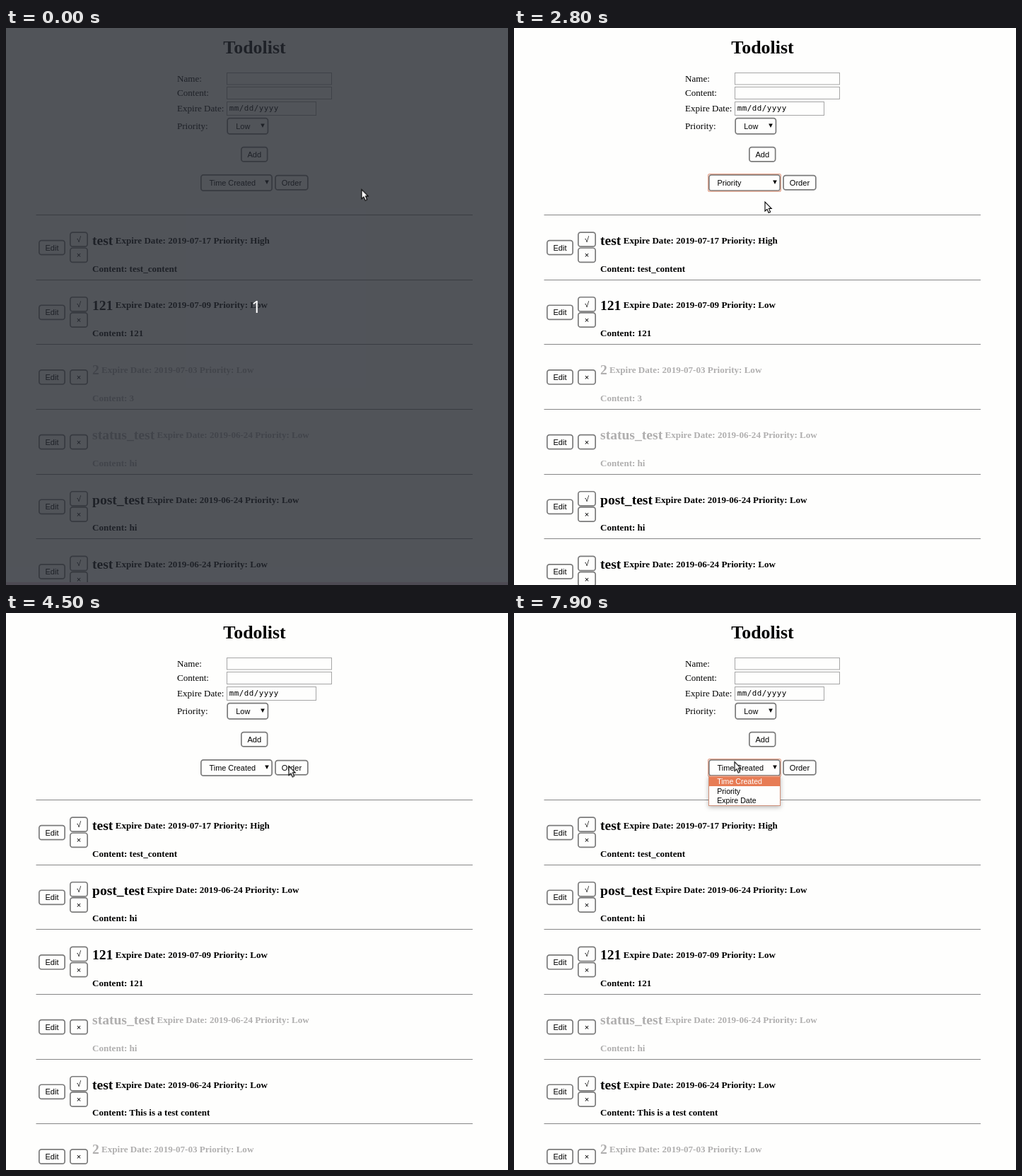
Animation of 710x788 px, one loop 8000 ms. Source, as an HTML page:

```html
<!DOCTYPE html>
<html lang="en">
<head>
<meta charset="utf-8">
<title>Todolist</title>
<style>
  html, body { margin: 0; width: 100%; height: 100%; overflow: hidden; background: #fefefd; }
  svg { display: block; width: 710px; height: 788px; }
  text { font: 13.07px "Liberation Serif", serif; white-space: pre; }
  .title { font-size: 25.9px; font-weight: bold; text-anchor: middle; }
  .row text { font-weight: bold; }
  .row .name { font-size: 19.6px; }
  .done text { fill: #b0afaf; }
  .ui { font: 10.9px "Liberation Sans", sans-serif; }
  .btn text { font: 11.1px "Liberation Sans", sans-serif; text-anchor: middle; }
  .btn rect { fill: #fefefd; stroke: #7b7b7b; stroke-width: 1.7; }
  .hot rect { fill: #808080; }
  .hot text { fill: #fff; }
  .field { fill: #fefefd; stroke: #a6a6a6; }
  .date { font: 10.9px "DejaVu Sans Mono", monospace; letter-spacing: .45px; }
  .ring { fill: none; stroke: #e3a189; stroke-width: 1.2; }
  .item { font: 10.6px "Liberation Sans", sans-serif; }
  .panel { fill: #fefefd; stroke: #cf8f78; filter: drop-shadow(0 2px 3px rgba(0, 0, 0, .28)); }
  .count { font: 24px "Noto Sans", sans-serif; fill: #fff; text-anchor: middle; }

  .anim, .cursor, .mark, .first, .second { animation: 8s step-end infinite; }
  .dim { animation-name: dim; }
  .before { animation-name: before; }
  .after { animation-name: after; }
  .created { animation-name: created; }
  .priority { animation-name: priority; }
  .menu { animation-name: menu; }
  .mark { animation-name: mark; }
  .first { animation-name: first; }
  .second { animation-name: second; }
  .selring { animation-name: selring; }
  .hover { animation-name: hover; }
  .btnring { animation-name: btnring; }
  .status { animation-name: status; }
  .blank1 { animation-name: blank1; }
  .blank2 { animation-name: blank2; }
  .cursor { animation-name: cursor; }

  @keyframes dim { 0% { opacity: 1 } 6.25%, 100% { opacity: 0 } }
  @keyframes before { 0% { opacity: 1 } 54%, 100% { opacity: 0 } }
  @keyframes after { 0% { opacity: 0 } 54%, 100% { opacity: 1 } }
  @keyframes created { 0% { opacity: 1 } 30% { opacity: 0 } 54%, 100% { opacity: 1 } }
  @keyframes priority { 0% { opacity: 0 } 30% { opacity: 1 } 54%, 100% { opacity: 0 } }
  @keyframes menu { 0% { opacity: 0 } 18.75% { opacity: 1 } 30% { opacity: 0 } 98.75%, 100% { opacity: 1 } }
  @keyframes mark { 0% { transform: none } 25% { transform: translateY(13.7px) } 50%, 100% { transform: none } }
  @keyframes first { 0% { fill: #fff } 25% { fill: #000 } 50%, 100% { fill: #fff } }
  @keyframes second { 0% { fill: #000 } 25% { fill: #fff } 50%, 100% { fill: #000 } }
  @keyframes selring { 0% { opacity: 0 } 18.75% { opacity: 1 } 43.75% { opacity: 0 } 98.75%, 100% { opacity: 1 } }
  @keyframes hover {
    0% { opacity: 0 } 11.25% { opacity: 1 } 12.5% { opacity: 0 }
    37.5% { opacity: 1 } 50% { opacity: 0 }
    67.5% { opacity: 1 } 68.75%, 100% { opacity: 0 }
  }
  @keyframes btnring { 0% { opacity: 0 } 43.75% { opacity: 1 } 50%, 100% { opacity: 0 } }
  @keyframes status { 0% { opacity: 0 } 47.5% { opacity: 1 } 52.5%, 100% { opacity: 0 } }
  @keyframes blank1 { 0% { opacity: 0 } 50% { opacity: 1 } 56.25%, 100% { opacity: 0 } }
  @keyframes blank2 { 0% { opacity: 0 } 52.5% { opacity: 1 } 56.25%, 100% { opacity: 0 } }
  @keyframes cursor {
    0% { transform: translate(503px, 228.5px); opacity: 1 }
    7.5% { transform: translate(492px, 227px) }
    8.75% { transform: translate(467px, 222px) }
    10% { transform: translate(434px, 217px) }
    11.25% { transform: translate(402px, 214px) }
    12.5% { transform: translate(378px, 213px) }
    13.75% { transform: translate(367px, 213.5px) }
    21.25% { transform: translate(364px, 224.5px) }
    23.75% { transform: translate(357px, 238px) }
    25% { transform: translate(349px, 249px) }
    30% { transform: translate(348.5px, 252.5px) }
    35% { transform: translate(355px, 246px) }
    36.25% { transform: translate(371px, 233px) }
    37.5% { transform: translate(387px, 223px) }
    38.75% { transform: translate(396px, 218px) }
    40% { transform: translate(400px, 216.5px) }
    67.5% { transform: translate(394px, 212px) }
    68.75% { transform: translate(335px, 172px) }
    70% { transform: translate(251.5px, 113.5px); opacity: 1 }
    71.25% { transform: translate(251.5px, 113.5px); opacity: 0 }
    86.25% { transform: translate(228.5px, 104.5px); opacity: 1 }
    87.5% { transform: translate(258px, 140px) }
    88.75% { transform: translate(292px, 181px) }
    90% { transform: translate(310.5px, 200px) }
    92.5%, 100% { transform: translate(312px, 210.5px); opacity: 1 }
  }
</style>
</head>
<body>
<svg id="stage" viewBox="0 0 710 788"></svg>
<script>
const text = (x, y, str, cls = "") => `<text x="${x}" y="${y}" class="${cls}">${str}</text>`;
const rect = (x, y, w, h, attrs = "") =>
  `<rect x="${x}" y="${y}" width="${w}" height="${h}" ${attrs}/>`;

// Rounded box given by its outer edges, with a centred label
const button = (x, y, w, h, label = "", cls = "") =>
  `<g class="btn ${cls}">${rect(x + .85, y + .85, w - 1.7, h - 1.7, 'rx="3.4"')}` +
  text(x + w / 2, y + h / 2 + 3.9, label) + "</g>";

const arrow = (x, y) => `<path d="M${x - 2.8} ${y}h5.6l-2.8 5.5z"/>`;
const field = (y, w, h) => rect(312.5, y, w, h, 'class="field"');

const todos = [
  ["test", "2019-07-17", "High", "test_content"],
  ["121", "2019-07-09", "Low", "121"],
  ["2", "2019-07-03", "Low", "3", true],
  ["status_test", "2019-06-24", "Low", "hi", true],
  ["post_test", "2019-06-24", "Low", "hi"],
  ["test", "2019-06-24", "Low", "This is a test content"]
];

function row(id, i) {
  const [name, date, priority, content, done] = todos[id];
  const y = 264.5 + i * 91.68;
  const tools = done
    ? button(90, y + 35.2, 26, 21.8, "×")
    : button(90, y + 23.7, 26, 21.8, "√") + button(90, y + 45.9, 26, 21.8, "×");
  return `<g class="row ${done ? "done" : ""}">` +
    rect(42.5, Math.round(y - .5), 617.5, 1, 'fill="#868686"') +
    `<g class="tools">${button(46, y + 35.2, 38, 21.8, "Edit")}${tools}</g>` +
    `<text x="122" y="${y + 42.5}"><tspan class="name">${name}</tspan>` +
    `<tspan dx="3.3" dy="-2.2">Expire Date: ${date} Priority: ${priority}</tspan></text>` +
    text(122, y + 80.2, "Content: " + content) + "</g>";
}

const list = (order, cls) => `<g class="anim ${cls}">${order.map(row).join("")}</g>`;

const form =
  text(351.5, 36, "Todolist", "title") +
  text(242, 75.6, "Name:") + text(242, 96, "Content:") +
  text(242, 118, "Expire Date:") + text(242, 142.8, "Priority:") +
  field(63.5, 148, 16.5) + field(83.5, 148, 17) + field(104.5, 126, 19) +
  text(315.8, 117.4, "mm/dd/yyyy", "date") +
  button(312.3, 126.8, 59, 24) + text(325.3, 142.7, "Low", "ui") + arrow(363, 135.5) +
  button(332, 167.8, 38.5, 22, "Add") +
  button(275, 207, 102, 24) + arrow(369, 215.5) +
  text(287.5, 222.8, "Time Created", "ui anim created") +
  text(287.5, 222.8, "Priority", "ui anim priority") +
  button(380.2, 207.8, 47.5, 22, "Order") +
  button(380.2, 207.8, 47.5, 22, "Order", "hot anim hover") +
  rect(379.8, 207.2, 48.4, 23.2, 'rx="3" class="ring anim btnring"') +
  rect(274.6, 206.6, 102.8, 24.6, 'rx="2" class="ring anim selring"');

const menu = '<g class="anim menu">' +
  rect(275.5, 230.5, 101, 42, 'class="panel"') +
  rect(276, 231.3, 100, 13.7, 'class="mark" fill="#e77c55"') +
  text(287.2, 241.9, "Time Created", "item first") +
  text(287.2, 255.6, "Priority", "item second") +
  text(287.2, 268.9, "Expire Date", "item") + "</g>";

const overlay = '<g class="anim dim">' +
  rect(0, 0, 710, 788, 'fill="#262a31" fill-opacity=".8"') +
  rect(0, 784, 710, 4, 'fill="#4d4a53"') +
  text(354, 403, "1", "count") + "</g>";

document.getElementById("stage").innerHTML =
  form + list([0, 1, 2, 3, 4, 5], "before") + list([0, 4, 1, 3, 5, 2], "after") + menu +
  '<path class="anim status" d="M-1 779.5H92q2.5 0 2.5 2.5V789H-1z" fill="#f1f1f1" stroke="#d0d0d0"/>' +
  rect(0, 0, 710, 664, 'class="anim blank1" fill="#fefefd"') +
  rect(0, 664, 710, 124, 'class="anim blank2" fill="#fefefd"') +
  overlay +
  '<path class="cursor" d="M0 0V13L3 10.3 5.2 15.4 7.6 14.3 5.4 9.4H9.2Z" fill="#fff" stroke="#000" stroke-width="1.1"/>';

// Tool labels stay dark in finished rows
document.querySelectorAll(".tools text").forEach(t => t.style.fill = "#000");
</script>
</body>
</html>
```
